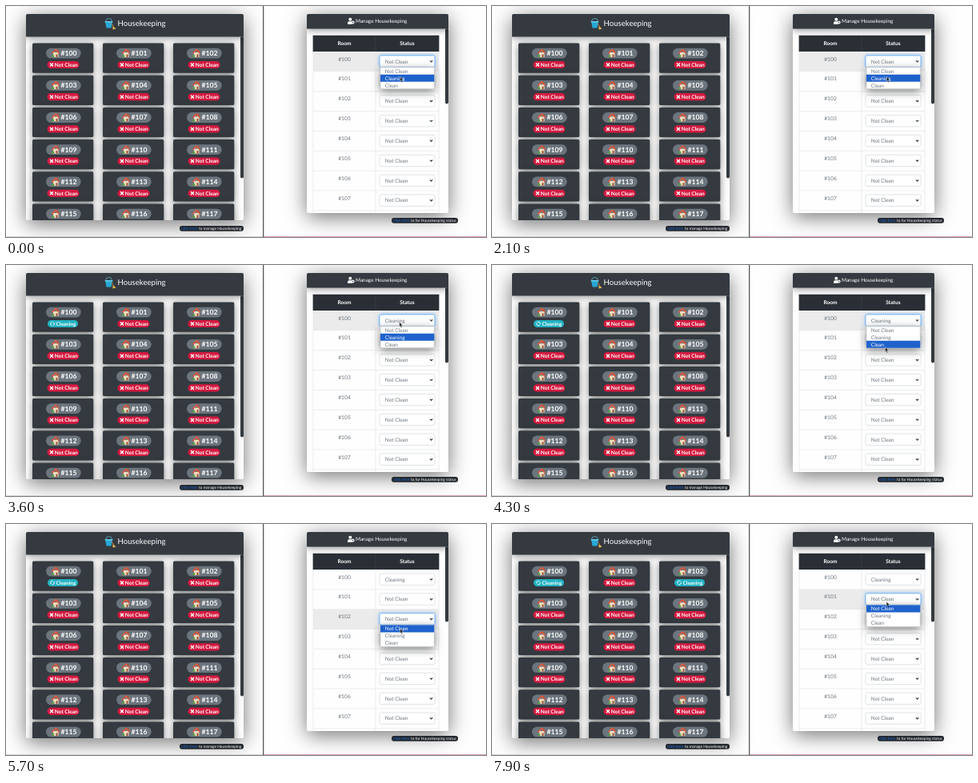
These frames come from a looping animation (600x289 px, 8 s). An HTML page with a canvas:

```html
<!DOCTYPE html>
<html lang="en">
<head>
<meta charset="utf-8">
<title>Housekeeping</title>
<style>
html, body { margin: 0; width: 100%; height: 100%; overflow: hidden; background: #fefefe; }
canvas { display: block; }
</style>
</head>
<body>
<canvas id="stage" width="600" height="289"></canvas>
<script>
const ctx = document.getElementById('stage').getContext('2d');
const LOOP = 8000, STEP = 100;
const DARK = '#343a40', HEAD = '#2a2f35', GREY = '#6c757d', RED = '#d5193f', CYAN = '#22b2c2';
const LABELS = ['Not Clean', 'Cleaning', 'Clean'];
const ROW_TOP = 57, ROW_H = 24.85, ITEM_H = 9;
const SETTLE = 150, REPLY = 450;

// Each visit opens one row's menu; the pointer moves between two item positions.
const VISITS = [
  { row: 0, open: 0, shut: 2700, from: 0.9, to: 0.9, pick: 1 },
  { row: 0, open: 3600, shut: 4500, from: -1, to: 3 },
  { row: 2, open: 5200, shut: 6900, from: -0.1, to: 0.8, pick: 1 },
  { row: 1, open: 7600, shut: LOOP, from: -1.3, to: -0.8 },
];

const selectY = row => ROW_TOP + row * ROW_H + 12.2;
const itemY = (row, item) => selectY(row) + 12 + item * ITEM_H;

function glide(a, b, t, start, end) {
  const u = (t - start) / (end - start);
  return a + (b - a) * u * u * (3 - 2 * u);
}

const valueOf = (room, t) =>
  VISITS.some(v => v.row === room && v.pick && t >= v.shut + SETTLE) ? 1 : 0;

function poseAt(t) {
  const i = VISITS.findLastIndex(v => v.open <= t), v = VISITS[i];
  const pose = { focus: v.row, x: 492.5 + Math.sin(t / 900), open: t < v.shut };
  if (pose.open) {
    const item = glide(v.from, v.to, t, v.open, v.shut);
    pose.y = itemY(v.row, item);
    pose.active = item < -0.5 ? valueOf(v.row, t) : Math.min(2, Math.round(Math.abs(item)));
  } else {
    const next = VISITS[i + 1];
    pose.y = glide(itemY(v.row, v.to), itemY(next.row, next.from), t, v.shut, next.open);
  }
  const held = t < v.shut + SETTLE;
  pose.hover = held ? v.row : Math.floor((pose.y - ROW_TOP) / ROW_H);
  return pose;
}

function box(x, y, w, h, fill, r = 0, stroke) {
  ctx.beginPath();
  ctx.roundRect(x, y, w, h, r);
  ctx.fillStyle = fill;
  ctx.fill();
  if (stroke) {
    ctx.shadowColor = 'transparent';
    ctx.strokeStyle = stroke;
    ctx.lineWidth = 0.8;
    ctx.stroke();
  }
}

function shadowed(blur, dy, alpha, draw, rgb = '0,0,0') {
  ctx.save();
  ctx.shadowColor = `rgba(${rgb},${alpha})`;
  ctx.shadowBlur = blur;
  ctx.shadowOffsetY = dy;
  draw();
  ctx.restore();
}

// Text is placed by the vertical middle of its capitals.
function text(s, x, cy, size, fill, weight = 400, align = 'left') {
  ctx.font = `${weight} ${size}px Lato, "Open Sans", sans-serif`;
  ctx.textRendering = 'geometricPrecision';
  ctx.textAlign = align;
  ctx.fillStyle = fill;
  ctx.fillText(s, x, cy + size * 0.36);
}

function shape(fill, ...points) {
  ctx.beginPath();
  points.forEach(p => ctx.lineTo(...p));
  ctx.closePath();
  ctx.fillStyle = fill;
  ctx.fill();
}

function line(color, width, ...points) {
  ctx.beginPath();
  points.forEach(p => ctx.lineTo(...p));
  ctx.strokeStyle = color;
  ctx.lineWidth = width;
  ctx.stroke();
}

function arc(x, y, r, from, to, color, width) {
  ctx.beginPath();
  ctx.arc(x, y, r, from, to);
  ctx.strokeStyle = color;
  ctx.lineWidth = width;
  ctx.stroke();
}

function dot(x, y, r, fill) {
  ctx.beginPath();
  ctx.arc(x, y, r, 0, 7);
  ctx.fillStyle = fill;
  ctx.fill();
}

function house(x, y) {
  box(x - 3, y - 1, 6.5, 6, '#f0dcc0');
  box(x + 0.5, y + 1.5, 2, 3.5, '#9b5136');
  box(x + 2, y - 5, 1.4, 3, '#a65638');
  line('#e2573d', 1.6, [x - 4.5, y + 0.2], [x, y - 4.3], [x + 4.5, y + 0.2]);
  dot(x - 3.2, y + 3.6, 1.6, '#5b9e44');
}

function bucket(x, y) {
  arc(x, y, 4, Math.PI, 0, '#5fb4d2', 0.8);
  shape('#27a8d4', [x - 4.5, y], [x + 4.5, y], [x + 3, y + 8], [x - 3, y + 8]);
  box(x - 5, y - 0.5, 10, 1.6, '#67cdec', 0.8);
  line('#c48b51', 1, [x + 3, y + 2], [x + 6, y + 6]);
  shape('#efb94f', [x + 5, y + 5.5], [x + 9, y + 9], [x + 5, y + 10]);
}

function card(n, t) {
  const x = 33 + (n % 3) * 88, y = 46.5 + Math.floor(n / 3) * 40.2, cy = y + 27;
  shadowed(10, 2, 0.5, () => box(x, y, 76.3, 37.2, DARK, 1.5));
  box(x + 17, y + 6.2, 43.7, 12.8, GREY, 6.4);
  house(x + 29, y + 12.5);
  text('#' + (100 + n), x + 35.6, y + 12.5, 8.6, '#fff', 700);
  if (valueOf(n, t - REPLY + SETTLE)) {
    box(x + 19, cy - 4.6, 38, 9.2, CYAN, 4.6);
    const turn = t / 1000 * Math.PI;
    for (const a of [turn, turn + Math.PI]) arc(x + 25, cy, 2.3, a, a + 2.6, '#fff', 1);
    text('Cleaning', x + 29.6, cy, 6.4, '#fff', 700);
  } else {
    box(x + 18.5, cy - 4.6, 40, 9.2, RED, 4.6);
    for (const d of [-2, 2]) line('#fff', 1.4, [x + 24 - d, cy - 2], [x + 24 + d, cy + 2]);
    text('Not Clean', x + 27.8, cy, 6.5, '#fff', 700);
  }
}

function panel(x, y, w, h, headH, drawBody) {
  shadowed(26, 5, 0.55, () => box(x, y, w, h, '#fefefe', 2));
  ctx.save();
  ctx.beginPath();
  ctx.rect(x, y, w, h);
  ctx.clip();
  drawBody();
  shadowed(9, 2, 0.4, () => box(x, y, w, headH, DARK, [2, 2, 0, 0]));
  ctx.restore();
}

function note(x, y, w, rest) {
  box(x, y, w, 6.8, '#24292e', 3);
  text('click here', x + 2.3, y + 3.3, 4.8, '#1769e8');
  text(rest, x + 24, y + 3.3, 4.8, '#fff');
}

function row(i, t, { hover, focus }) {
  const y = ROW_TOP + i * ROW_H, cy = selectY(i);
  if (i === hover) box(384, y, 157, ROW_H, '#ebebeb');
  line('#e4e6e8', 0.7, [384, y + ROW_H], [541, y + ROW_H]);
  text('#' + (100 + i), 423, y + 9.2, 6.7, GREY, 400, 'center');
  const frame = () => box(467, cy - 7.2, 69, 14.4, '#fff', 1.8, i === focus ? '#65aef5' : '#d9dde1');
  if (i === focus) shadowed(4, 0, 0.8, frame, '70,155,245');
  else frame();
  text(LABELS[valueOf(i, t)], 473.8, cy, 6.5, GREY);
  line(DARK, 1.1, [530, cy - 0.9], [531.6, cy + 0.8], [533.2, cy - 0.9]);
}

function menu(i, active) {
  shadowed(11, 3, 0.5, () => box(468, itemY(i, 0) - 4.5, 67.3, 27, '#fff', 0, '#c4c7ca'));
  LABELS.forEach((s, k) => {
    const y = itemY(i, k), on = k === active;
    if (on) box(468, y - 4.5, 67.3, ITEM_H, '#1f62cc');
    text(s, 473.8, y, 6.5, on ? '#fff' : GREY);
  });
}

function pointer(x, y) {
  const p = [[x, y - 1], [x, y + 5], [x + 1.6, y + 3.8], [x + 4, y + 3.2]];
  shape('#222', ...p);
  line('#222', 1, p[2], [x + 2.6, y + 5.8]);
  line('#fff', 0.4, ...p, p[0]);
}

function userIcon(x, y) {
  dot(x, y - 2, 2, '#fff');
  box(x - 3.3, y + 0.5, 5.8, 3.5, '#fff', [2, 2, 0.5, 0.5]);
  dot(x + 3.3, y + 1.8, 2, '#fff');
  dot(x + 3.3, y + 1.8, 0.7, DARK);
}

function draw(t) {
  const pose = poseAt(t);
  box(0, 0, 600, 289, '#fefefe');

  panel(25, 10, 272, 258, 28.5, () => {
    for (let n = 0; n < 18; n++) card(n, t);
    box(293, 38, 4, 177.5, DARK, 2);
  });
  bucket(128.5, 19.5);
  text('Housekeeping', 139.6, 21.8, 9.6, '#fff');
  note(217, 274.9, 80, 'to manage Housekeeping');

  panel(376, 10, 177, 249, 18.5, () => {
    for (let i = 0; i < 8; i++) row(i, t, pose);
    for (const x of [384, 462, 541]) line('#e4e6e8', 0.7, [x, ROW_TOP], [x, 259]);
    box(383.6, 36.7, 157.8, 20.4, HEAD);
    line('#3d4349', 0.7, [462, 37], [462, ROW_TOP]);
    text('Room', 423, 47, 6.6, '#fff', 700, 'center');
    text('Status', 501.5, 47, 6.6, '#fff', 700, 'center');
    box(549, 28, 4, 94.5, DARK, 2);
  });
  userIcon(430.3, 18.7);
  text('Manage Housekeeping', 437, 19, 6.45, '#fff');
  note(482, 265, 83, 'to for Housekeeping status');

  box(0, 288, 321, 1, '#d4d4d4');
  box(322, 288, 278, 1, '#dc9fb4');
  box(321, 0, 1.3, 289, '#55585b');

  if (pose.open) menu(pose.focus, pose.active);
  pointer(pose.x, pose.y);
}

function tick() {
  draw(Math.floor(performance.now() % LOOP / STEP) * STEP);
  requestAnimationFrame(tick);
}
tick();
</script>
</body>
</html>
```
